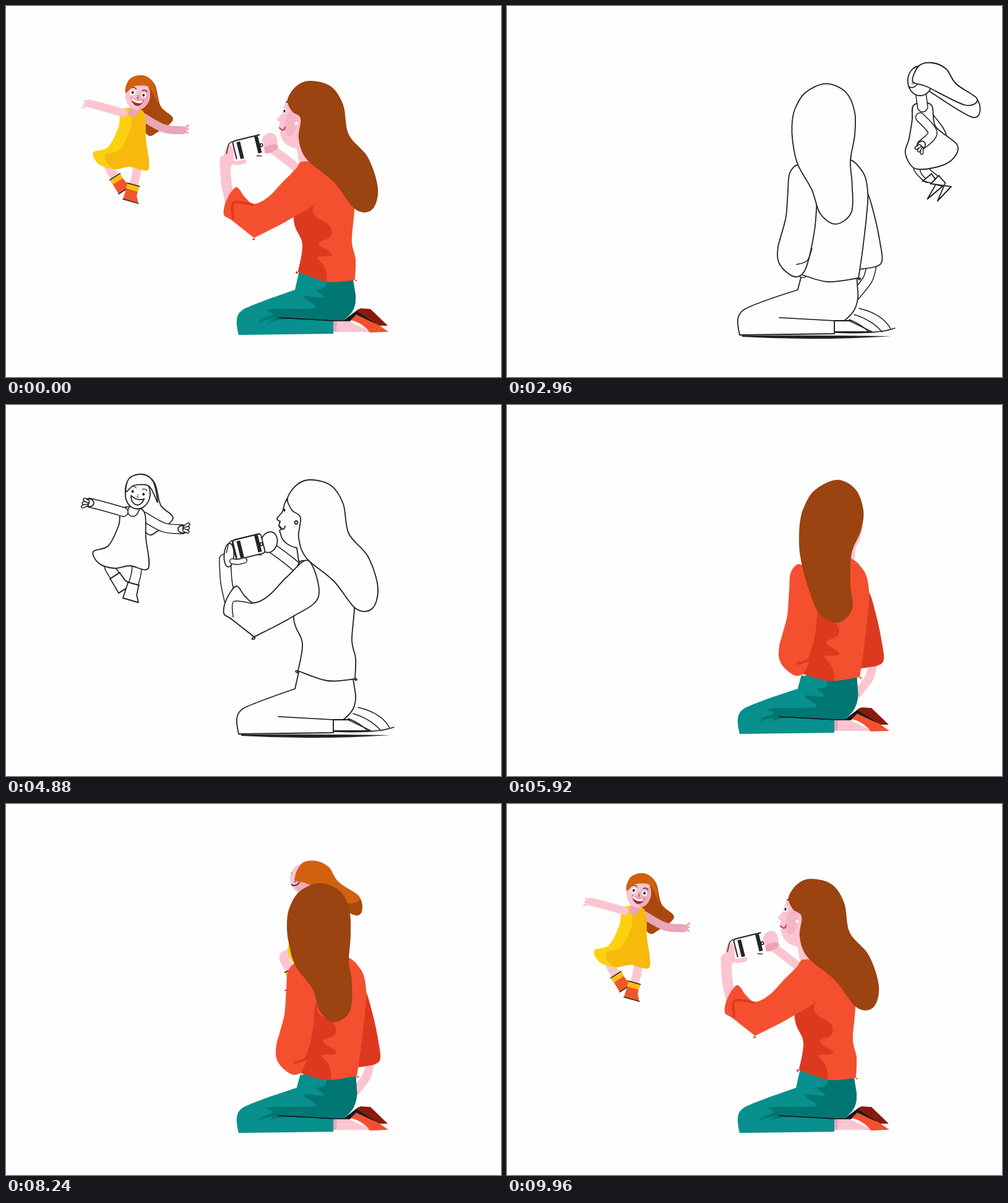
Write an HTML page with a canvas that moves like this. It is 800 px wide and 600 px high and loops after 10 s.

```html
<!DOCTYPE html>
<html lang="en">
<head>
<meta charset="utf-8">
<title>Playtime</title>
<style>
  html, body { margin: 0; width: 100%; height: 100%; overflow: hidden; background: #fefefe; }
  canvas { display: block; }
</style>
</head>
<body>
<canvas id="stage" width="800" height="600"></canvas>
<script>
const ctx = document.getElementById('stage').getContext('2d');
const INK = '#222', SKIN = '#fbc4d1', BLUSH = '#e9a6b8', RED = '#f4502f', DEEP = '#dd391f';
let sketch = false;

// ---- pose helpers -------------------------------------------------------
const pts = s => s.split(' ').map(p => p.split(',').map(Number));
const mapPose = (v, fn) => Array.isArray(v[0]) ? v.map(fn) : v;
const transform = (pose, fn) =>
  Object.fromEntries(Object.entries(pose).map(([k, v]) => [k, mapPose(v, fn)]));
const shift = (pose, dx) => transform(pose, ([x, y]) => [x + dx, y]);

function mix(a, b, k) {
  if (typeof a === 'number') return a + (b - a) * k;
  if (Array.isArray(a)) return a.map((v, i) => mix(v, b[i], k));
  return Object.fromEntries(Object.keys(a).map(key => [key, mix(a[key], b[key], k)]));
}
function poseAt(keys, p, ease = k => k) {
  const i = keys.findIndex((key, n) => n && p <= key[0]);
  const [t0, a] = keys[i - 1], [t1, b] = keys[i];
  return a === b ? a : mix(a, b, ease((p - t0) / (t1 - t0)));
}
const smooth = k => k * k * (3 - 2 * k);

// ---- drawing helpers ----------------------------------------------------
function spline(p, closed = true) {
  const path = new Path2D(), n = p.length;
  const at = i => closed ? p[(i + n) % n] : p[Math.max(0, Math.min(n - 1, i))];
  path.moveTo(...p[0]);
  for (let i = 0; i < n - (closed ? 0 : 1); i++) {
    const [a, b, c, d] = [at(i - 1), at(i), at(i + 1), at(i + 2)];
    path.bezierCurveTo(b[0] + (c[0] - a[0]) / 6, b[1] + (c[1] - a[1]) / 6,
      c[0] - (d[0] - b[0]) / 6, c[1] - (d[1] - b[1]) / 6, ...c);
  }
  return path;
}
function line(path, color = INK, width = 1.5) {
  ctx.strokeStyle = color;
  ctx.lineWidth = width;
  ctx.stroke(path);
}
function shape(path, color) {
  ctx.fillStyle = sketch ? '#fefefe' : color;
  ctx.fill(path);
  if (sketch) line(path, INK, 1.8);
}
const tint = (path, color) => {
  if (sketch) return;
  ctx.fillStyle = color;
  ctx.fill(path);
};
function oval(x, y, rx, ry, angle = 0) {
  const path = new Path2D();
  path.ellipse(x, y, rx, ry, angle, 0, 7);
  return path;
}
function limb(points, width, color) {
  const path = spline(points, false);
  if (sketch) line(path, INK, width + 3);
  line(path, sketch ? '#fefefe' : color, width);
}
function inside(clip, draw) {
  ctx.save();
  ctx.clip(clip);
  draw();
  ctx.restore();
}
function placed(x, y, angle, draw) {
  ctx.save();
  ctx.translate(x, y);
  ctx.rotate(angle);
  draw();
  ctx.restore();
}

// ---- mother -------------------------------------------------------------
const photo = {
  hair: pts('455,151 470,129 492,121 525,130 545,160 554,208 585,245 601,295 592,329 565,329 530,285 486,248 473,215 476,182 462,170'),
  torso: pts('489,252 470,264 465,345 479,385 472,430 472,430 520,446 564,443 564,443 565,410 559,380 563,325 555,300 530,265'),
  sleeve: pts('489,252 455,277 425,308 401,320 386,309 372,293 356,315 352,337 364,346 401,375 401,375 462,343 505,310'),
  fold: pts('367,343 368,318 398,321'),
  farArm: pts('485,275 455,250 425,228'),
  nearArm: pts('362,315 356,285 354,250'),
  cheek: pts('500,200'),
  grip: pts('392,229'),
  face: [0, 0], tilt: [-.24], waist: [0], farX: [-60], shade: [0, 0]
};
const lowered = {
  hair: pts('425,151 440,126 466,119 500,128 518,158 525,195 545,240 547,280 535,325 506,341 495,310 468,264 445,225 451,183 436,168'),
  torso: pts('460,255 449,275 453,358 468,385 467,433 467,433 515,446 559,442 559,442 560,425 547,380 547,330 545,290 505,260'),
  sleeve: pts('460,255 440,283 415,318 405,331 400,327 392,328 381,345 380,360 390,382 412,388 412,388 452,358 485,310'),
  fold: pts('392,378 394,350 406,333'),
  farArm: pts('460,275 450,265 438,256'),
  nearArm: pts('390,345 378,315 376,286'),
  cheek: pts('480,200'),
  grip: pts('406,262'),
  face: [-27, -1], tilt: [-.42], waist: [-4], farX: [-75], shade: [-12, 3]
};
const turned = {
  hair: pts('480,165 497,138 533,121 563,136 576,170 572,203 557,240 555,290 558,330 535,352 505,338 485,290 474,245 472,212 474,186'),
  torso: pts('470,262 468,290 490,345 488,390 474,433 474,433 520,446 570,440 570,440 576,400 583,340 585,300 576,267 545,246'),
  sleeve: pts('475,258 459,270 456,300 453,340 445,371 440,390 440,411 450,427 468,438 482,430 492,400 501,345 500,290'),
  fold: pts('470,418 487,412 495,392'),
  farArm: pts('592,415 585,442 563,470'),
  nearArm: pts('470,420 475,425 480,430'),
  cheek: pts('563,207'),
  grip: pts('510,390'),
  face: [66, 0], tilt: [0], waist: [4], farX: [0], shade: [10, 0]
};
const passing = {
  ...shift(turned, -3),
  hair: pts('458,168 475,141 507,128 540,141 555,172 557,212 554,255 559,287 556,335 530,353 507,335 496,300 468,262 457,225 454,196'),
  cheek: pts('505,205'),
  face: [55, 8], farX: [-4], shade: [7, 0]
};
const watching = {
  hair: pts('414,146 435,128 465,121 495,135 508,172 519,217 545,250 552,290 549,330 529,341 511,325 490,285 450,245 437,215 436,180'),
  torso: pts('448,247 432,264 468,360 474,400 473,432 473,432 515,449 558,447 558,447 558,410 546,370 541,340 545,290 500,250'),
  sleeve: pts('448,247 430,262 425,300 420,345 415,370 412,390 416,403 430,430 445,432 462,425 469,375 464,342 470,290'),
  fold: pts('416,405 440,417 466,412'),
  farArm: pts('545,400 545,420 540,440'),
  nearArm: pts('440,425 451,440 458,452'),
  cheek: pts('480,200'),
  grip: pts('508,390'),
  face: [-38, 3], tilt: [0], waist: [-1], farX: [-45], shade: [-8, 0]
};
const motherKeys = [[0, photo], [.02, photo], [.125, turned], [.5, turned], [.6, passing],
  [.645, passing], [.735, watching], [.775, watching], [.835, lowered], [.855, lowered], [.93, photo], [1, photo]];

const farSleeve = pts('585,303 598,345 606,385 609,411 600,421 572,426 572,426 575,380 578,330');
const profile = new Path2D('M456 149C448 158 449 170 446 174L438 183Q438 187 443 188L441 195L446 200L442 203C443 207 444 208 445 213C448 222 459 229 470 231L473 252L495 265L500 195L478 150Z');
const torsoShade = new Path2D('M500 320C495 326 492 336 505 344C525 352 530 362 525 372C520 380 503 378 506 386C512 392 529 398 527 403C520 408 498 402 504 409C515 420 520 428 518 448L455 440L479 385L445 344Z');
const trouserShade = new Path2D('M518 445C519 455 514 459 502 458C498 463 514 465 514 471C510 474 481 467 481 470C484 478 505 483 500 488C495 492 440 488 423 491C418 494 436 496 430 500C420 503 410 506 407 515C414 507 425 507 434 505L421 514C430 509 440 507 460 506L545 509C560 497 566 490 572 468L570 440Z');

function legs(w) {
  shape(new Path2D('M529 509H553L590 527H529Z'), SKIN);
  tint(new Path2D('M529 509H535L534 527H529Z'), BLUSH);
  if (sketch) {
    line(new Path2D('M553 507Q570 513 586 528M561 499Q590 508 606 527M569 489Q607 498 620 522M530 528Q600 531 627 521'));
  } else {
    tint(new Path2D('M545 509L570 490L606 517L570 504L556 509Z'), '#17191c');
    tint(new Path2D('M566 493L573 489L589 490L617 517L603 517Z'), '#871b0d');
    tint(new Path2D('M557 508L566 499L604 517L618 527L588 528C580 517 570 511 557 508Z'), RED);
  }
  const cloth = new Path2D(`M${474 + w} 428L${467 + w * .7} 459C435 470 395 484 383 491C371 499 371 510 376 532L529 530V509H545C560 497 566 488 ${565 + w * .6} 468L${560 + w * 1.3} 437Z`);
  shape(cloth, '#07908d');
  inside(cloth, () => tint(trouserShade, '#007673'));
  line(new Path2D('M440 504L530 509H556'), '#111', 1.5);
  if (sketch) {
    ctx.fillStyle = INK;
    ctx.fill(new Path2D('M380 533Q500 532 622 534Q500 542 380 535Z'));
  }
}
function phone() {
  shape(oval(34, 1, 13, 17, .5), SKIN);
  tint(oval(33, 10, 14, 6, -.1), BLUSH);
  shape(oval(-34, 6, 8, 19, .3), SKIN);
  const body = new Path2D();
  body.roundRect(-24, -16, 48, 32, 4);
  shape(body, '#fff');
  line(new Path2D('M-23 13V-14Q-22 -16 -18 -16H22'), '#222', 2);
  ctx.fillStyle = '#24242a';
  ctx.fillRect(-17, -13, 6, 28);
  ctx.fillRect(13, -15, 6, 28);
  line(oval(21, 1, 2, 2.5), '#111', 1.5);
  limb([[-31, 17], [-22, 20], [-12, 20]], 7, SKIN);
  line(new Path2D('M-37 1L-30 -13L-24 -16M10 16L17 18'), '#422', 1.5);
}
function mother(m) {
  const torso = spline(m.torso), [faceX, faceY] = m.face;
  limb(m.farArm, 14, SKIN);
  shape(spline(farSleeve.map(([x, y]) => [x + m.farX[0], y])), DEEP);
  legs(m.waist[0]);
  limb(m.nearArm, 17, SKIN);
  placed(...m.grip[0], m.tilt[0], phone);
  placed(faceX, faceY, 0, () => {
    shape(profile, SKIN);
    tint(oval(461, 189, 10, 22, .2), '#f5b5c8');
    line(new Path2D('M453 155Q458 154 460 160'), '#331713', 1.7);
    tint(oval(450, 170, 3.5, 4), '#fff');
    ctx.fillStyle = INK;
    ctx.fill(oval(450, 170, 1.6, 2.6));
    line(new Path2D('M442 197Q449 205 451 196'), sketch ? INK : '#d72c34', 2);
  });
  shape(oval(...m.cheek[0], 10, 27, .25), SKIN);
  shape(torso, RED);
  inside(torso, () => placed(...m.shade, 0, () => tint(torsoShade, DEEP)));
  shape(spline(m.sleeve), RED);
  line(spline(m.fold, false), sketch ? INK : DEEP, sketch ? 1.5 : 4);
  shape(spline(m.hair), '#9b4311');
  placed(faceX, faceY, 0, () => {
    if (faceX < 20) shape(oval(469, 190, 2.5, 2.5), '#fff');
  });
}

// ---- child --------------------------------------------------------------
const posing = {
  hair: pts('195,150 198,121 220,112 240,126 250,162 270,183 245,204 226,206'),
  cap: pts('194,140 199,119 220,112 238,124 245,157 238,142 229,130 207,130'),
  dress: pts('188,167 222,171 226,215 230,264 200,260 175,264 150,256 141,237 165,228 182,195'),
  armA: pts('190,173 162,165 135,158'), armB: pts('222,180 255,198 285,201'),
  legA: pts('163,250 169,265 176,276'), legB: pts('212,260 210,275 206,289'),
  head: pts('213,144'), look: [0, .25], grin: [1], toe: [16]
};
const kicking = {
  hair: pts('95,205 62,190 60,158 82,128 105,105 132,102 112,118 101,170'),
  cap: pts('99,148 66,183 61,157 82,128 105,105 132,102 112,118 104,130'),
  dress: pts('100,163 127,158 144,190 182,199 178,215 155,236 130,240 103,247 104,220 99,185'),
  armA: pts('103,175 115,205 138,210'), armB: pts('124,176 152,185 178,179'),
  legA: pts('150,225 168,240 184,249'), legB: pts('115,240 118,268 122,289'),
  head: pts('118,133'), look: [6, -.2], grin: [0], toe: [27]
};
const spinning = {
  hair: pts('80,165 82,135 105,122 127,128 124,158 184,152 150,192 100,197'),
  cap: pts('80,165 82,135 105,122 127,128 121,158 180,153 148,190 100,196'),
  dress: pts('103,200 150,200 165,222 180,242 155,262 135,268 115,262 97,268 99,240 101,220'),
  armA: pts('102,203 94,211 84,201'), armB: pts('120,202 150,216 186,204'),
  legA: pts('115,262 104,282 126,290'), legB: pts('128,262 130,282 129,296'),
  head: pts('120,149'), look: [10, 0], grin: [0], toe: [13]
};
const runLeft = {
  hair: pts('466,123 478,97 500,92 522,102 538,126 574,154 565,180 490,135'),
  cap: pts('468,122 478,97 500,92 522,102 538,126 572,150 552,160 490,130'),
  dress: pts('470,160 498,160 505,195 540,225 530,250 500,262 470,262 456,238 462,215 467,185'),
  armA: pts('480,180 500,205 482,225'), armB: pts('495,180 515,210 500,230'),
  legA: pts('480,238 450,246 460,268'), legB: pts('500,255 515,280 535,290'),
  head: pts('480,121'), look: [-13, 0], grin: [0], toe: [-22]
};
const runRight = { ...transform(runLeft, ([x, y]) => [1000 - x, y]), look: [13, 0], toe: [22] };
const otherStep = pose => ({ ...pose, legA: pose.legB, legB: pose.legA });
const stepLeft = otherStep(runLeft), stepRight = otherStep(runRight);

const childKeys = [[0, posing], [.012, posing], [.045, shift(runRight, -275)], [.075, shift(stepRight, -150)],
  [.105, shift(runRight, -25)], [.13, shift(stepRight, 40)], [.5, shift(stepLeft, 360)],
  [.545, shift(runLeft, 240)], [.585, shift(stepLeft, 115)], [.625, runLeft], [.66, shift(stepLeft, -125)],
  [.695, shift(runLeft, -250)], [.725, shift(stepLeft, -350)], [.76, spinning], [.775, spinning],
  [.835, kicking], [.86, kicking], [.93, posing], [1, posing]];

function boot([, knee, ankle], toe) {
  placed(...ankle, Math.atan2(ankle[1] - knee[1], ankle[0] - knee[0]) - Math.PI / 2, () => {
    const side = Math.sign(toe) || 1;
    shape(new Path2D(`M-9 0H9L${9 + side} 16L${toe} 27H${-10 * side}Z`), '#f1552c');
    tint(new Path2D('M-10 0H10V9H-10Z'), '#fdbc16');
    line(new Path2D('M-10 0H10'), INK, 1.5);
    line(new Path2D(`M${-10 * side} 27H${toe}`), INK, 1.5);
  });
}
function hand([, wrist, tip], color) {
  placed(...tip, Math.atan2(tip[1] - wrist[1], tip[0] - wrist[0]), () => {
    shape(oval(0, 0, 7, 6), color);
    for (const a of [-.9, -.3, .3]) limb([[3, a * 4], [9, a * 10]], 3, color);
  });
}
function childFace(c) {
  const [x, y] = c.head[0], [turn, tilt] = c.look, grin = c.grin[0] > .5;
  const head = oval(x, y, 20, 24, tilt * .4);
  shape(head, SKIN);
  inside(head, () => placed(x + turn, y, tilt, () => {
    tint(oval(13, 5, 12, 18), '#efacbc');
    for (const ex of [-9, 9]) {
      if (grin) tint(oval(ex, -2, 4.5, 4.5), '#fff');
      ctx.fillStyle = INK;
      ctx.fill(oval(ex, -2, 2, grin ? 2.2 : 3));
      line(new Path2D(`M${ex - 4} -9Q${ex} -12 ${ex + 4} -9`), '#422018', 1.3);
    }
    line(new Path2D('M0 0L2 5L-1 5'), '#8e4252', 1);
    const smile = new Path2D(grin ? 'M-10 5Q2 12 12 5Q9 20 -1 17Q-8 14 -10 5Z' : 'M-6 9Q1 14 8 6');
    if (grin) {
      shape(smile, '#a92835');
      tint(new Path2D('M-9 6Q2 12 11 6L9 11Q0 15 -8 10Z'), '#fff');
    } else line(smile, INK, 1.6);
  }));
}
function child(c) {
  const dress = spline(c.dress), [x, y] = c.head[0];
  const collar = mix(c.dress[0], c.dress[1], .5);
  shape(spline(c.hair), '#a8480f');
  limb(c.legA, 15, SKIN);
  limb(c.legB, 14, SKIN);
  boot(c.legA, c.toe[0]);
  boot(c.legB, c.toe[0]);
  limb(c.armB, 13, BLUSH);
  hand(c.armB, BLUSH);
  shape(dress, '#fdd10f');
  inside(dress, () => placed(19, 4, 0, () => tint(dress, '#f7b90c')));
  limb([[x, y + 12], [collar[0], collar[1] + 3]], 15, BLUSH);
  limb(c.armA, 13, SKIN);
  hand(c.armA, SKIN);
  childFace(c);
  shape(spline(c.cap), '#d2600f');
}

// ---- playback: a drawn pass followed by a painted pass ------------------
const LOOP = 10000, SKETCH_START = 40, PAINT_START = 5240;

function render(time) {
  const t = time % LOOP;
  sketch = t >= SKETCH_START && t < PAINT_START;
  const p = t < SKETCH_START ? 1
    : sketch ? (t - SKETCH_START) / (PAINT_START - SKETCH_START)
    : (t - PAINT_START) / (LOOP + SKETCH_START - PAINT_START);
  ctx.fillStyle = '#fefefe';
  ctx.fillRect(0, 0, 800, 600);
  ctx.lineCap = ctx.lineJoin = 'round';
  if (p < .13 || p > .5) child(poseAt(childKeys, p));
  if (sketch && p > .14 && p < .36) line(new Path2D('M575 154Q590 151 600 178'), INK, 1.2);
  mother(poseAt(motherKeys, p, smooth));
}
const start = performance.now();
function tick() {
  render(performance.now() - start);
  requestAnimationFrame(tick);
}
tick();
</script>
</body>
</html>
```
